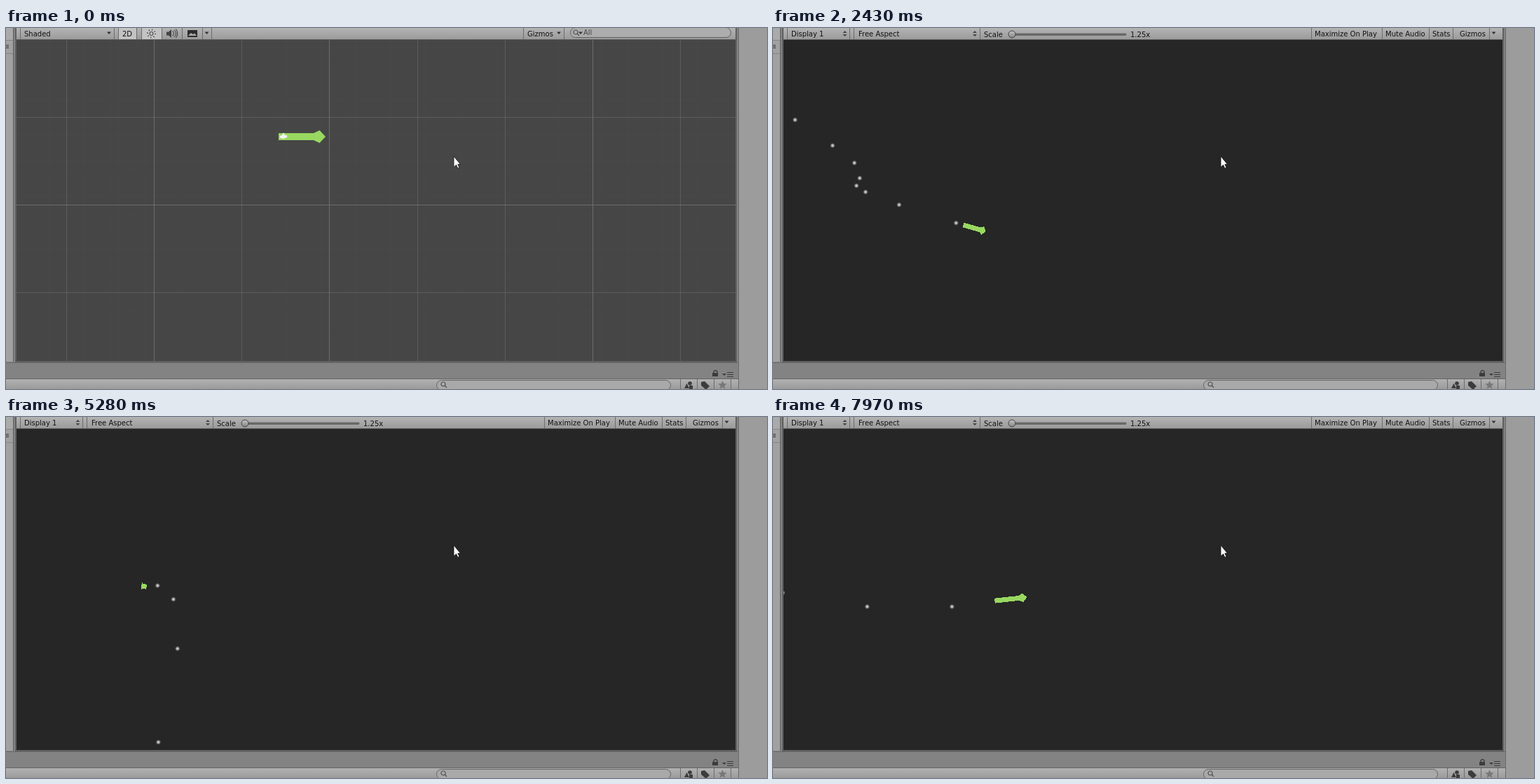
Write an HTML page that moves like this. It is 1086x515 px and loops after 8 s.

```html
<!DOCTYPE html>
<html lang="en">
<head>
<meta charset="utf-8">
<title>Arrow with particles</title>
<style>
  html, body { margin: 0; width: 100%; height: 100%; overflow: hidden; background: #838383; }
  svg { display: block; width: 1086px; height: 515px; }
  text { font: 10px "DejaVu Sans", Verdana, sans-serif; fill: #111; white-space: pre; }
  .sep { stroke: #6c6c6c; }
  .crisp { shape-rendering: crispEdges; }
</style>
</head>
<body>
<svg viewBox="0 0 1086 515">
  <defs>
    <linearGradient id="bar" x2="0" y2="1">
      <stop offset="0" stop-color="#b3b3b3"/><stop offset="1" stop-color="#9b9b9b"/>
    </linearGradient>
    <linearGradient id="knob" x2="0" y2="1">
      <stop offset="0" stop-color="#c4c4c4"/><stop offset="1" stop-color="#858585"/>
    </linearGradient>
    <radialGradient id="glow">
      <stop offset="0" stop-color="#eee"/><stop offset=".35" stop-color="#ccc" stop-opacity=".85"/>
      <stop offset=".75" stop-color="#aaa" stop-opacity=".4"/><stop offset="1" stop-color="#999" stop-opacity="0"/>
    </radialGradient>
    <clipPath id="view"><rect x="15" y="17" width="1026" height="458"/></clipPath>
    <path id="arrow" d="M0-5H50L58.5-9 67 0 58.5 9 50 5H0Z" fill="#98d860"/>
    <path id="down" d="M-3-1.5H3L0 2Z" fill="#333"/>
    <path id="updown" d="M-3-1H3L0-4ZM-3 1H3L0 4Z" fill="#444"/>
    <g id="lens" fill="none" stroke="#505050" stroke-width="1.2">
      <circle r="3"/><path d="M2 2L5 5"/>
    </g>
  </defs>

  <!-- window chrome -->
  <rect width="1086" height="515" fill="#838383"/>
  <rect x="1046" width="40" height="515" fill="#9c9c9c"/>
  <path class="crisp" d="M1045.5 0V515" stroke="#6a6a6a"/>
  <g class="crisp">
    <rect width="10" height="476" fill="#a1a1a1"/>
    <rect width="10" height="17" fill="#aaa"/>
    <path d="M0 17.5H10M0 36.5H10" stroke="#858585"/>
    <path d="M0 24.5H4M0 26.5H4M0 28.5H4" stroke="#444"/>
    <path d="M10.5 0V476" stroke="#5f5f5f"/>
    <rect x="13" width="1030" height="477" fill="#606060"/>
    <rect x="15" width="1026" height="16" fill="url(#bar)"/>
    <path d="M0 477.5H1045" stroke="#696969"/>
    <rect y="500" width="1045" height="15" fill="url(#bar)"/>
    <path d="M0 500.5H1045" stroke="#626262"/>
    <path class="sep" d="M962.5 501V515M986.5 501V515M1010.5 501V515M1034.5 501V515"/>
  </g>
  <rect x="614.5" y="502.5" width="334" height="14" rx="7" fill="#a9a9a9" stroke="#636363"/>
  <use href="#lens" x="624" y="508"/>
  <g fill="#3c3c3c">
    <path d="M1008 492H1016V497H1008Z"/>
    <path d="M1010 492V490Q1012.5 487 1015 490V492" fill="none" stroke="#3c3c3c" stroke-width="1.3"/>
    <path d="M1022 493H1028L1025 496Z"/>
    <path class="crisp" d="M1029 491.5H1038M1029 494.5H1038M1029 497.5H1038" stroke="#3c3c3c"/>
    <circle cx="976" cy="507" r="2.8"/>
    <path d="M968 514L971.5 507 975 514ZM975 510H980V515H975Z"/>
    <path d="M992 505L997 504 1004 511 999 516 992 510Z"/>
    <path id="star" fill="#777"/>
  </g>

  <g id="scene">
    <rect x="15" y="17" width="1026" height="458" fill="#464646"/>
    <g id="grid" class="crisp" fill="none" stroke="#fff"></g>
    <use href="#arrow" x="389" y="155"/>
    <path d="M391 157Q390 153 394 153L396 149 398 153Q402 152 401 156L396 158Z" fill="#f4f4f4"/>
    <rect x="161" width="25" height="16" fill="#c3c3c3"/>
    <rect x="194" width="28" height="16" fill="#c3c3c3"/>
    <path class="sep crisp" d="M20.5 0V16M154.5 0V16M160.5 0V16M186.5 0V16M193.5 0V16M222.5 0V16M251.5 0V16M280.5 0V16M293.5 0V16M738.5 0V16M796.5 0V16"/>
    <text x="26" y="12">Shaded</text><use href="#down" x="147" y="7"/>
    <text x="166" y="12">2D</text>
    <g stroke="#333" fill="none">
      <circle cx="207.5" cy="8" r="2.5"/>
      <circle cx="207.5" cy="8" r="5.5" stroke-width="2" stroke-dasharray="1 3.32"/>
      <path d="M238 4Q241 8 238 11.5M240 2.5Q245 8 240 13M242.5 1.5Q247 8 242.5 14"/>
    </g>
    <path d="M229 5.5H232L236 2V14L232 10.5H229Z" fill="#444"/>
    <rect x="259" y="3" width="14" height="10" fill="#2d2d2d"/>
    <path d="M260 11L264 7 267 9 269 7.5 272 11Z" fill="#aaa"/>
    <use href="#down" x="286.5" y="7"/>
    <text x="744" y="12">Gizmos</text><use href="#down" x="789" y="7"/>
    <rect x="805.5" y="-.5" width="229" height="14" rx="7" fill="#adadad" stroke="#606060"/>
    <use href="#lens" x="813" y="6"/><use href="#down" x="820" y="7"/>
    <text x="824" y="10" style="fill:#444">All</text>
  </g>

  <g id="game" display="none">
    <rect x="15" y="17" width="1026" height="458" fill="#262626"/>
    <path class="sep crisp" d="M20.5 0V16M109.5 0V16M115.5 0V16M295.5 0V16M768.5 0V16M869.5 0V16M936.5 0V16M970.5 0V16M1022.5 0V16"/>
    <text x="26" y="12">Display 1</text><use href="#updown" x="102.5" y="8"/>
    <text x="122" y="12">Free Aspect</text><use href="#updown" x="288" y="8"/>
    <text x="301" y="13">Scale</text>
    <rect x="337" y="8" width="167" height="2.5" rx="1" fill="#6b6b6b" stroke="#555" stroke-width=".6"/>
    <circle cx="341" cy="9" r="5" fill="url(#knob)" stroke="#444"/>
    <text x="510" y="13">1.25x</text>
    <text x="773" y="12">Maximize On Play</text>
    <text x="874" y="12">Mute Audio</text>
    <text x="941" y="12">Stats</text>
    <text x="980" y="12">Gizmos</text><use href="#down" x="1028.5" y="7"/>
    <g clip-path="url(#view)">
      <use id="flyer" class="crisp" href="#arrow"/>
      <g id="dots"></g>
    </g>
  </g>

  <path d="M639 183V198.500L642.500 195.300 644.800 200.200 647 199.200 644.800 194.500H648.500Z" fill="#fff" stroke="#111" stroke-width=".8"/>
</svg>
<script>
const LOOP = 8000, START = 500;
const HOME = [215, 262], REACH = 2.2;            // the tail trails the heading around this point
const STEP = 100, LIFE = 1000, SPEED = 0.026;    // dot emission
const $ = id => document.getElementById(id);

// time and on-screen arrow vector; it shortens as the arrow turns towards the viewer
const turns = [
  [500, 0, 0], [850, -1.5, 5.5], [1150, 2.3, 4], [1380, 4, -3], [1480, 16, 42], [1580, 14, 16],
  [2000, 10, 6], [2500, 33, 8], [2900, 14, -17], [3300, 8, -9], [3430, 23, -7], [3700, 20, 22],
  [3950, 36, 24], [4400, 40, -14], [4630, 41, -21], [4850, 10, -32], [5120, -6, -11],
  [5520, -7, 10], [5720, -3, 12], [5920, -10, 21], [6200, 6, 38], [6450, 37, 31],
  [6750, 44, 17], [7350, 43, 17], [7720, 46, 5], [7970, 46, -5]
];

function slope(i, c) {
  const a = turns[Math.max(i - 1, 0)], b = turns[Math.min(i + 1, turns.length - 1)];
  return (b[c] - a[c]) / (b[0] - a[0]);
}

// smooth curve through the turns
function heading(t) {
  const next = turns.findIndex(k => k[0] > t);
  const i = next < 0 ? turns.length - 2 : Math.max(next - 1, 0);
  const a = turns[i], b = turns[i + 1], d = b[0] - a[0];
  const u = Math.min(Math.max((t - a[0]) / d, 0), 1), v = 1 - u;
  return [1, 2].map(c =>
    a[c] * v * v * (1 + 2 * u) + b[c] * u * u * (3 - 2 * u)
    + d * u * v * (slope(i, c) * v - slope(i + 1, c) * u));
}

// the tail follows the mean of the recent headings
function tail(t) {
  const recent = [50, 100, 150, 200].map(lag => heading(t - lag));
  return HOME.map((h, c) => h + REACH * recent.reduce((sum, r) => sum + r[c], 0) / recent.length);
}

function add(parent, name, attrs) {
  const el = document.createElementNS("http://www.w3.org/2000/svg", name);
  for (const k in attrs) el.setAttribute(k, attrs[k]);
  return parent.appendChild(el);
}

const dots = [];
for (let born = START + 20; born < LOOP; born += STEP) {
  const el = add($("dots"), "circle", { r: 3.7, fill: "url(#glow)" });
  dots.push({ born, from: tail(born), dir: heading(born), el });
}

function gridLines(step, opacity) {
  let d = "";
  for (let x = 211.5 - Math.floor(196 / step) * step; x < 1041; x += step) d += `M${x} 17V475`;
  for (let y = 252.5 - Math.floor(235 / step) * step; y < 475; y += step) d += `M15 ${y}H1041`;
  add($("grid"), "path", { d, "stroke-opacity": opacity });
}
gridLines(12.52, .012);
gridLines(125.2, .11);
add($("grid"), "path", { d: "M211.5 17V475M461.5 17V475M837.5 17V475M15 252.5H1041", "stroke-opacity": .1 });

const starPoints = Array.from({ length: 10 }, (_, i) => {
  const r = i % 2 ? 2.9 : 6.6, a = i * Math.PI / 5;
  return `${1022.5 + r * Math.sin(a)} ${509.5 - r * Math.cos(a)}`;
});
$("star").setAttribute("d", `M${starPoints.join("L")}Z`);

function draw(t) {
  const playing = t >= START;
  $("scene").setAttribute("display", playing ? "none" : "inline");
  $("game").setAttribute("display", playing ? "inline" : "none");
  if (!playing) return;

  const [x, y] = tail(t), [dx, dy] = heading(t);
  const angle = Math.atan2(dy, dx) * 180 / Math.PI;
  $("flyer").setAttribute("transform",
    `translate(${x} ${y}) rotate(${angle}) scale(${Math.hypot(dx, dy) / 67} .69)`);

  for (const { born, from, dir, el } of dots) {
    const age = t - born, live = age >= 0 && age < LIFE;
    el.setAttribute("display", live ? "inline" : "none");
    if (!live) continue;
    el.setAttribute("cx", from[0] - dir[0] * SPEED * age);
    el.setAttribute("cy", from[1] - dir[1] * SPEED * age);
  }
}

const begin = performance.now();
function tick() {
  draw((performance.now() - begin) % LOOP);
  requestAnimationFrame(tick);
}
tick();
</script>
</body>
</html>
```
